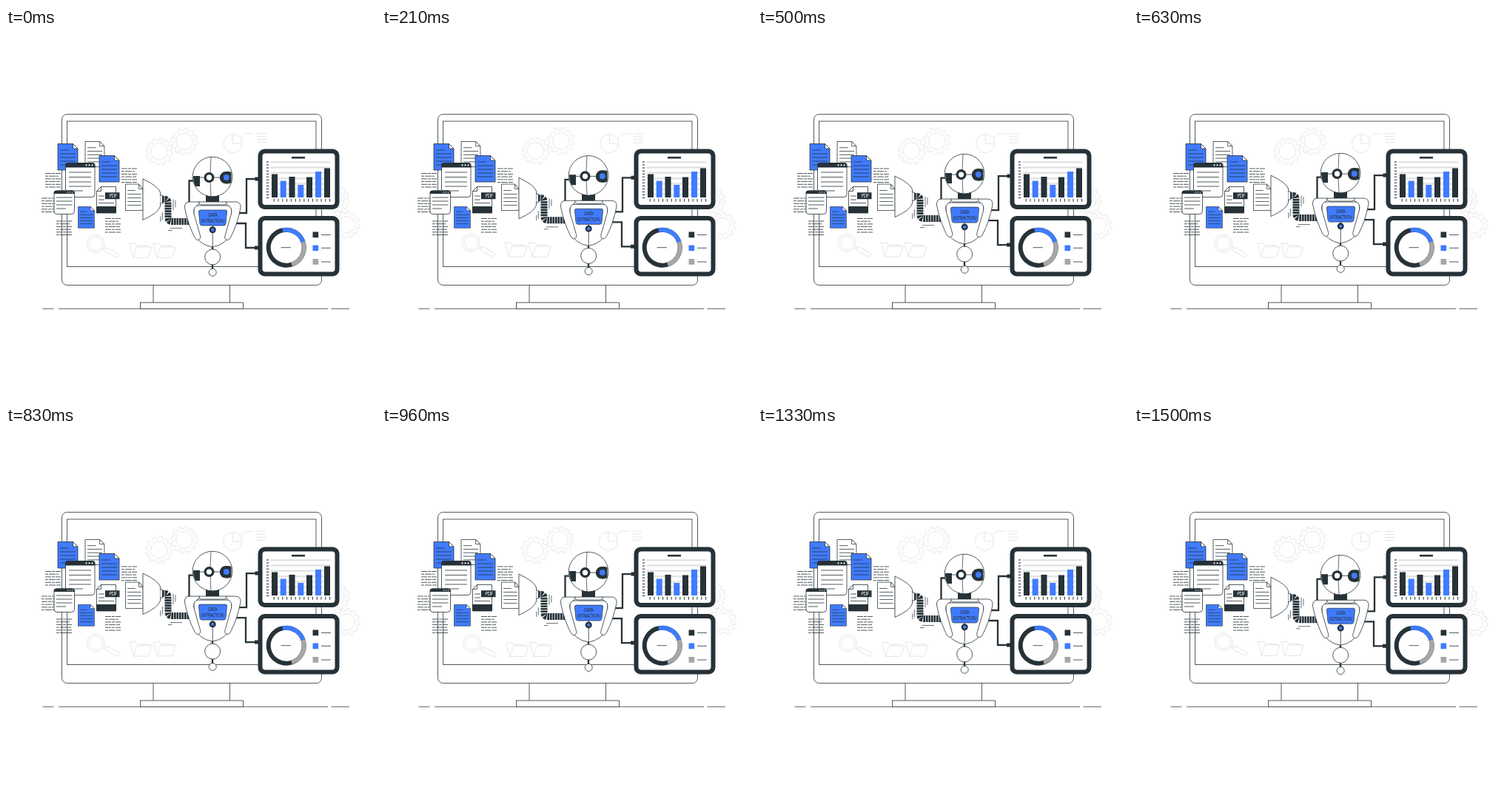
An HTML page without scripts for the animation above (1540 ms loop, 500 by 500 pixels).

```html
<!DOCTYPE html>
<html lang="en">
<head>
<meta charset="utf-8">
<title>Data extraction</title>
<style>
  html, body { margin: 0; height: 100%; overflow: hidden; background: #fff; }
  svg { display: block; width: 100vw; height: 100vh; }
  .line { fill: none; stroke: #263238; stroke-width: .8; }
  .thin { fill: none; stroke: #263238; stroke-width: .7; }
  .shape { fill: #fff; stroke: #263238; stroke-width: .8; }
  .dark { fill: #263238; }
  .blue { fill: #407bff; }
  .gray { fill: #a6a6a6; }
  .pale { fill: none; stroke: #dedede; stroke-width: .8; }
  .pipe { fill: none; stroke: #263238; stroke-width: 2.3; }
  text { font-family: "Open Sans", sans-serif; text-anchor: middle; letter-spacing: -.6px; }
  .sway { transform-origin: 293.5px 223px; animation: sway 1540ms linear -40ms infinite; }
  .float { animation: float 1540ms linear -40ms infinite; }
  @keyframes sway {
    0%, 50%, 100% { transform: rotate(0deg); }
    25% { transform: rotate(1deg); }
    75% { transform: rotate(-1deg); }
  }
  @keyframes float {
    0%, 100% { transform: translateY(.3px); }
    50% { transform: translateY(-5.7px); }
  }
</style>
</head>
<body>
<svg viewBox="0 0 500 500">
  <defs>
    <!-- A slightly smaller white cog on a pale one leaves its outline -->
    <g id="gear">
      <circle r="15.4" fill="#dedede"/>
      <circle r="16.4" pathLength="24" fill="none" stroke="#dedede" stroke-width="4" stroke-dasharray="1.15 .85"/>
      <circle r="14.7" fill="#fff"/>
      <circle r="16" pathLength="24" fill="none" stroke="#fff" stroke-width="3.4" stroke-dasharray=".97 1.03" stroke-dashoffset="-.09"/>
      <circle r="11.3" class="pale"/>
    </g>
    <path id="folder" class="pale" d="M5 19 0 0H9L11 3H25L25.5 4.5M5 19H25.5L30 4.5H9.5Z"/>
    <g id="page">
      <path d="M0 0H20.5L27 6.5V35.5H0Z" stroke="#263238" stroke-width=".8"/>
      <path d="M20.5 0V6.5H27Z" class="shape"/>
      <path d="M3 8.5H15M3 13.5H24M3 18.5H24M3 23.5H24M3 28.5H24" class="line"/>
    </g>
    <g id="note" class="line">
      <path d="M0 0H21M0 7.4H21M0 14.8H21" stroke-dasharray="8 1 4 1 7 0"/>
      <path d="M0 3.7H18M0 11.1H20M0 18.5H21" stroke-dasharray="4 1 9 1 6 0"/>
    </g>
    <g id="tablet">
      <rect width="110" height="81.5" rx="9" class="dark"/>
      <rect x="6" y="6" width="98" height="69.5" rx="4" fill="#fff"/>
    </g>
  </defs>

  <!-- Monitor -->
  <g class="line">
    <path d="M49.5 379.5H64.5M71 379.5H435M439.500 379.5H464" stroke-width=".7"/>
    <rect x="75.500" y="116.500" width="351" height="231" rx="7"/>
    <rect x="82.500" y="126" width="336.500" height="196.500"/>
    <path d="M199 347.500V371M302.500 347.500V371"/>
    <rect x="181.500" y="371" width="139" height="8.500" class="shape"/>
  </g>

  <!-- Background icons -->
  <g class="sway">
    <use href="#gear" x="207" y="167"/>
    <use href="#gear" x="241" y="153.500"/>
    <use href="#gear" x="446" y="231.500"/>
    <use href="#gear" x="460" y="265.500"/>
    <g class="pale">
      <circle cx="306.500" cy="156" r="12.500"/>
      <path d="M306.500 143.500V156H319M317 148.500 323.500 142.500H335"/>
      <path d="M339 142.500H352M339 146.500H352M339 150.500H352M339 154.500H352"/>
      <circle cx="121" cy="292" r="12"/>
      <circle cx="121" cy="292" r="9.200"/>
      <g transform="translate(121 292) rotate(28)">
        <path d="M12 -1.500H15M12 1.500H15"/>
        <rect x="15" y="-2.700" width="21" height="5.400" rx="2.500"/>
      </g>
    </g>
    <use href="#folder" x="167" y="291.500"/>
    <use href="#folder" x="199" y="291.500"/>
  </g>

  <!-- Documents -->
  <use href="#note" x="53" y="196.500"/>
  <use href="#note" x="48" y="230"/>
  <use href="#note" x="68" y="261"/>
  <use href="#note" x="156" y="190"/>
  <use href="#note" x="134" y="257.500"/>
  <use href="#page" x="70" y="156.500" class="blue"/>
  <use href="#page" transform="translate(107 153.500) scale(.96)" fill="#fff"/>
  <use href="#page" x="126" y="172.500" class="blue"/>
  <use href="#page" transform="translate(97.500 241.500) scale(.81)" class="blue"/>
  <use href="#page" transform="translate(161.500 211) scale(.88 1)" fill="#fff"/>
  <g>
    <rect x="80.500" y="182.500" width="39.500" height="46" rx="4" class="shape"/>
    <path d="M80 188.500V186Q80 182 84 182H116.500Q120.500 182 120.500 186V188.500Z" class="dark"/>
    <path d="M108.500 185.300h0M112.500 185.300h0M116.500 185.300h0" stroke="#fff" stroke-width="2.200" stroke-linecap="round"/>
    <path d="M85 195H115M85 201.500H115M85 208H115M85 214H115M85 220H104" class="line"/>
  </g>
  <g>
    <rect x="65" y="220" width="27.500" height="31.500" rx="4" class="shape"/>
    <path d="M64.600 224V222.500Q65 219.600 68 219.600H89.500Q92.500 219.600 92.900 222.500V224Z" class="dark"/>
    <path d="M83.500 221.900h0M86.500 221.900h0M89.500 221.900h0" stroke="#fff" stroke-width="1.500" stroke-linecap="round"/>
    <path d="M68 229H89.500M68 234H89.500M68 239H89.500M68 244H81" class="line"/>
  </g>
  <g>
    <path d="M122.500 220.500 128.500 214.500H148.500V250H122.500Z" class="shape"/>
    <path d="M122.500 220.500H128.500V214.500Z" class="shape"/>
    <path d="M125 227H133M125 232H133M125 236.500H146" class="line"/>
    <path d="M122 241H149V250H122ZM134 222.300H153.500V231.300H134Z" class="dark"/>
    <text x="144.300" y="229.200" font-size="6.500" fill="#fff">PDF</text>
  </g>

  <!-- Robot -->
  <g class="float">
    <path d="M314 250H325V204H342M311 264H324V297H342" class="pipe"/>
    <path d="M336.500 201.500H343V206.500H336.500ZM336 294.500H343V299.500H336Z" class="dark"/>

    <path d="M185 204Q206 214 208.500 222V241Q206 250 185 259.500Z" class="shape"/>
    <path d="M208.500 226H211.500V237H208.500" class="shape"/>
    <path d="M211 231.500H215Q219 231.500 219 236V256Q219 261.500 224 261.500H248" fill="none" stroke="#263238" stroke-width="9" stroke-dasharray="2.700 .8"/>
    <path d="M226 231.500V246M229 233V242.500M208.800 254.500V262M211.300 249V259.500M222 270.500H238M219 273.500H224.500" class="thin"/>

    <path d="M247.500 263V206.500H256" class="pipe"/>
    <rect x="270" y="226" width="18" height="10" class="dark"/>
    <circle cx="279" cy="201" r="26.800" class="shape"/>
    <path d="M277 174.300Q274.500 201 277 227.500" class="thin"/>
    <path d="M253 200H262V214H256Q253 208 253 200Z" class="dark"/>
    <path d="M262 202H300" class="line"/>
    <path d="M297 194Q301 193.500 304.500 195V209Q301 211 297 210.500A8.200 8.200 0 0 1 297 194Z" class="dark"/>
    <circle cx="297.800" cy="202" r="4" class="blue"/>
    <circle cx="274.500" cy="202" r="7" class="dark"/>
    <circle cx="274.500" cy="202" r="3.700" fill="#fff"/>

    <path d="M279 290V326" class="pipe" stroke-width="2"/>
    <path d="M254 240H305L304 276Q298 293 279 296Q260 293 254 276Z" class="shape"/>
    <path id="shoulder" d="M262 235H248Q241 235 241.500 243Q246 266 255 283Q258 288 261 286Q264 284 262 279L254 251Q252 242 260 239Z" class="shape"/>
    <use href="#shoulder" transform="matrix(-1 0 0 1 558.500 0)"/>
    <path d="M261 235H298V237Q297 239 294 239H265Q262 239 261 237Z" class="shape"/>
    <path d="M262.500 246H296.500Q299 246 298.500 249L297 264.500Q296.500 267 294 267H265Q262.500 267 262 264.500L260.500 249Q260 246 262.500 246Z" class="blue" stroke="#263238" stroke-width=".7"/>
    <g class="dark" font-size="6.200">
      <text x="279.200" y="255">DATA</text>
      <text x="279.200" y="262.800">EXTRACTION</text>
    </g>
    <path d="M279.200 267V296" class="line"/>
    <circle cx="279.200" cy="272.800" r="4.500" class="dark"/>
    <circle cx="279.200" cy="272.800" r="2.200" class="blue"/>
    <circle cx="279.200" cy="309.500" r="10.500" class="shape"/>
    <circle cx="279.200" cy="330.300" r="5" class="shape"/>
  </g>

  <!-- Bar chart -->
  <use href="#tablet" x="340.500" y="163.500"/>
  <path d="M386 175.200H404" stroke="#263238" stroke-width="2.600"/>
  <path d="M398 180V229" stroke="#e3e3e3" stroke-width="80" stroke-dasharray="2.500 4.800"/>
  <path d="M353.500 180.500V230.500" stroke="#263238" stroke-width="3.500" stroke-dasharray="1 3.050"/>
  <path d="M361.700 232.700H439" stroke="#263238" stroke-width="4" stroke-dasharray="1 4.800"/>
  <path d="M359 197.500h8V229h-8ZM382.500 201h8V229h-8ZM406 201.500h8V229h-8ZM430 189.500h8V229h-8Z" class="dark"/>
  <path d="M370.700 206.500h8V229h-8ZM394.300 212h8V229h-8ZM418 194h8V229h-8Z" class="blue"/>

  <!-- Ring chart -->
  <use href="#tablet" x="340.500" y="254"/>
  <g transform="translate(378.700 296.700) rotate(-102)" fill="none" stroke-width="6">
    <circle r="24" stroke="#263238"/>
    <circle r="24" pathLength="360" stroke="#407bff" stroke-dasharray="83 277"/>
    <circle r="24" pathLength="360" stroke="#a6a6a6" stroke-dasharray="91 269" stroke-dashoffset="-83"/>
  </g>
  <path d="M371.500 296.700H385M426 279.500H439M426 297.300H439M426 316H439" class="line"/>
  <rect x="414.500" y="275.500" width="7.700" height="7.700" class="dark"/>
  <rect x="414.500" y="293.500" width="7.700" height="7.700" class="blue"/>
  <rect x="414.500" y="312" width="7.700" height="7.700" class="gray"/>
</svg>
</body>
</html>
```
